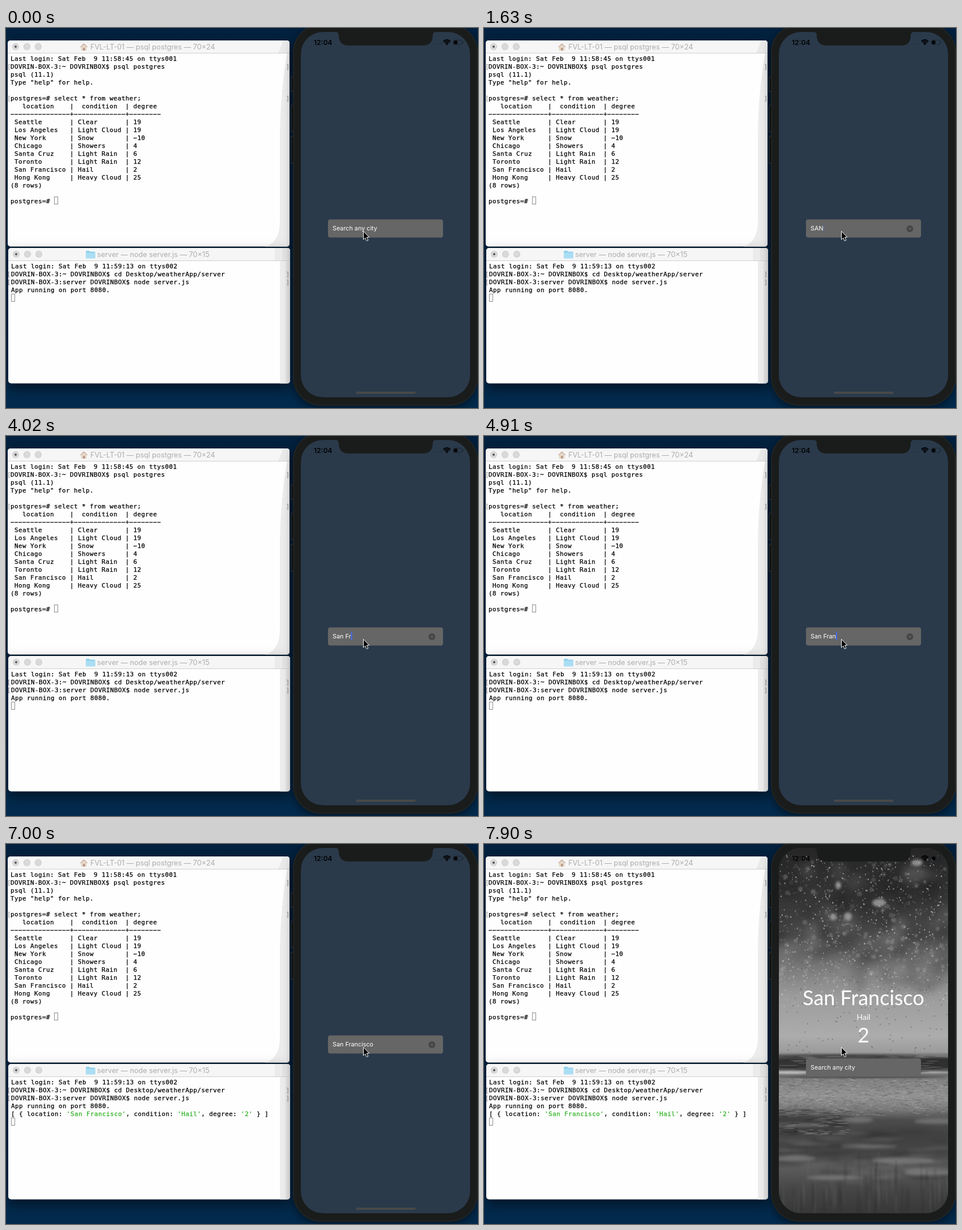
An HTML page with a canvas that plays this animation: 834x672 px, repeating every 8000 ms.

```html
<!DOCTYPE html>
<html lang="en">
<head>
<meta charset="utf-8">
<title>Weather app demo</title>
<style>
html, body { margin: 0; width: 100%; height: 100%; overflow: hidden; background: #01223f; }
canvas { display: block; }
</style>
</head>
<body>
<canvas id="stage" width="834" height="672"></canvas>
<script>
const W = 834, H = 672, LOOP = 8000, CELL = 7;
const LOG_AT = 6860, RESULT_AT = 7010, PHOTO_AT = 7900;
const MONO = '11px "DejaVu Sans Mono", monospace';
const UI = 'Inter, sans-serif', TITLE = 'Lato, sans-serif';
const BODY = '#1a1c1b', SCREEN = '#2a3a4b';
const c = document.getElementById('stage').getContext('2d');

// [time, typed text, caret opacity]
const typing = [
  [0, '', 0], [300, '', .5], [440, '', 1], [740, 'S', 1], [1480, 'SA', 1], [1630, 'SAN', .2],
  [2230, 'SA', .5], [2380, 'S', 1], [2680, 'Sa', 1], [2820, 'San', 1], [3120, 'San ', 1],
  [3570, 'San F', .5], [3720, 'San F', 1], [4020, 'San Fr', 1], [4610, 'San Fra', .5],
  [4760, 'San Fran', .7], [4910, 'San Fran', 1], [5510, 'San Franc', 1], [5810, 'San Franci', 1],
  [5960, 'San Francis', 1], [6260, 'San Francisco', 0], [RESULT_AT, '', 0]
];

const weather = [
  ['Seattle', 'Clear', '19'], ['Los Angeles', 'Light Cloud', '19'], ['New York', 'Snow', '−10'],
  ['Chicago', 'Showers', '4'], ['Santa Cruz', 'Light Rain', '6'], ['Toronto', 'Light Rain', '12'],
  ['San Francisco', 'Hail', '2'], ['Hong Kong', 'Heavy Cloud', '25']
];
const psqlLines = [
  'Last login: Sat Feb  9 11:58:45 on ttys001',
  'DOVRIN-BOX-3:~ DOVRINBOX$ psql postgres',
  'psql (11.1)',
  'Type "help" for help.',
  '',
  'postgres=# select * from weather;',
  '   location    |  condition  | degree',
  [15, 13, 8].map(n => '−'.repeat(n)).join('+'),
  ...weather.map(([city, sky, deg]) => ` ${city.padEnd(14)}| ${sky.padEnd(12)}| ${deg}`),
  '(8 rows)',
  '',
  'postgres=# '
];
const serverLines = [
  'Last login: Sat Feb  9 11:59:13 on ttys002',
  'DOVRIN-BOX-3:~ DOVRINBOX$ cd Desktop/weatherApp/server',
  'DOVRIN-BOX-3:server DOVRINBOX$ node server.js',
  'App running on port 8080.'
];
const logLine = "[ { location: 'San Francisco', condition: 'Hail', degree: '2' } ]";

function text(str, x, y, font, color, align = 'left') {
  c.font = font;
  c.fillStyle = color;
  c.textAlign = align;
  c.fillText(str, x, y);
}

function mono(str, x, y, color = '#000') {
  c.font = MONO;
  c.letterSpacing = CELL - c.measureText('0').width + 'px';
  text(str, x, y, MONO, color);
  c.strokeStyle = color;
  c.lineWidth = .25;
  c.strokeText(str, x, y);
  c.letterSpacing = '0px';
}

function round(x, y, w, h, r, color) {
  c.beginPath();
  c.roundRect(x, y, w, h, r);
  c.fillStyle = color;
  c.fill();
}

function shape(d, color, stroke) {
  const path = new Path2D(d);
  c.fillStyle = color;
  c.fill(path);
  if (stroke) {
    c.strokeStyle = stroke;
    c.lineWidth = 1;
    c.stroke(path);
  }
}

function disc(x, y, r, color) {
  c.beginPath();
  c.arc(x, y, r, 0, 7);
  c.fillStyle = color;
  c.fill();
}

function windowFrame(x, y, h, title, titleX) {
  c.save();
  c.shadowColor = 'rgba(0,0,0,.5)';
  c.shadowBlur = 22;
  c.shadowOffsetY = 9;
  round(x, y, 498, h, 5, '#fefefe');
  c.restore();
  round(x, y, 498, 22, [5, 5, 0, 0], '#f6f6f6');
  c.fillStyle = '#cfcfcf';
  c.fillRect(x, y + 22, 498, 1);
  for (let i = 0; i < 3; i++) {
    disc(x + 14 + i * 20, y + 11, 6, '#c6c6c6');
    disc(x + 14 + i * 20, y + 11, 5.2, '#d9d9d9');
  }
  disc(x + 14, y + 11, 2, '#555');
  text(title, titleX, y + 15.5, '12.7px ' + UI, '#acacac');
}

function promptMarks(y) {
  mono('[', 2, y, '#999');
  mono(']', 494.5, y, '#999');
}

function terminalCursor(x, y) {
  c.strokeStyle = '#8c8c8c';
  c.lineWidth = 1;
  c.strokeRect(x + .5, y + .5, 6, 13);
}

function psqlWindow() {
  windowFrame(3, 22, 364.5, 'FVL-LT-01 — psql postgres — 70×24', 149);
  shape('M490 22H496Q501 22 501 27V44H481Z', '#e9e9e9');
  shape('M497 45Q486 100 484 180V340Q484 380 458 386.5H496Q501 386.5 501 381V45Z', '#ececec');
  shape('M130.5 34L137.5 27L144.5 34Z', '#c9a99b');
  shape('M132.5 33.5L137.5 29L142.5 33.5V40H132.5Z', '#e6d9c9');
  shape('M136 35H139.5V40H136Z', '#b99a86');
  psqlLines.forEach((line, i) => mono(line, 8, 58 + 14 * i));
  promptMarks(72);
  promptMarks(128);
  terminalCursor(85, 298);
}

function serverWindow(logged) {
  windowFrame(4, 389, 239.5, 'server — node server.js — 70×15', 161);
  shape('M475 389H488V411H475Z', '#ebebeb');
  shape('M488 389H497Q502 389 502 394V411H488Z', '#e2e2e2');
  shape('M484 412H494V628.5H484Z', '#ececec');
  shape('M494 412H502V623Q502 628.5 497 628.5H494Z', '#e2e2e2');
  shape('M141 395.5Q141 394 142.5 394H147L148.5 395.5H156Q157.5 395.5 157.5 397V407H141Z', '#8fcfea');
  shape('M141 397.5H157.5V407.5H141Z', '#a9def4');
  serverLines.forEach((line, i) => mono(line, 9, 425 + 14 * i));
  promptMarks(439);
  promptMarks(453);
  if (logged) {
    mono(logLine.replace(/'[^']*'/g, s => ' '.repeat(s.length)), 9, 481);
    for (const m of logLine.matchAll(/'[^']*'/g)) mono(m[0], 9 + CELL * m.index, 481, '#2bb01f');
  }
  terminalCursor(9, logged ? 484 : 470);
}

// Monochrome rainy street, drawn once in screen coordinates.
function makePhoto() {
  const canvas = document.createElement('canvas');
  canvas.width = 299;
  canvas.height = 646;
  const p = canvas.getContext('2d');
  let seed = 7;
  const rnd = () => (seed = seed * 16807 % 2147483647) / 2147483647;
  const gray = (v, a = 1) => `rgba(${v},${v},${v},${a})`;
  const blob = (x, y, rx, ry, color) => {
    p.beginPath();
    p.ellipse(x, y, rx, ry, 0, 0, 7);
    p.fillStyle = color;
    p.fill();
  };
  p.translate(-521, -7);
  const g = p.createLinearGradient(0, 7, 0, 653);
  [[7, 38], [100, 54], [165, 76], [225, 126], [270, 156], [340, 172], [368, 155], [378, 80],
   [402, 85], [412, 125], [445, 146], [468, 125], [488, 75], [545, 68], [575, 90], [610, 70], [653, 55]]
    .forEach(([y, v]) => g.addColorStop((y - 7) / 646, gray(v)));
  p.fillStyle = g;
  p.fillRect(521, 7, 299, 646);

  p.filter = 'blur(7px)';
  for (let i = 0; i < 80; i++)
    blob(521 + rnd() * 299, 30 + rnd() * 220, 8 + rnd() * 14, 8 + rnd() * 12, gray(rnd() < .55 ? 20 : 150, .18));
  p.filter = 'blur(2px)';
  [[617, 129, 6, 6], [643, 128, 7, 7], [698, 104, 12, 7], [626, 73, 5, 7], [765, 33, 10, 6]]
    .forEach(b => blob(...b, gray(180, .7)));
  p.filter = 'blur(1px)';
  for (let i = 0; i < 200; i++) {
    const r = 1 + rnd() * 3.5;
    blob(521 + rnd() * 299, 30 + rnd() * 210, r, r, gray(175, .1 + rnd() * .25));
  }
  p.filter = 'none';
  for (let i = 0; i < 1000; i++) {
    const y = 20 + rnd() * 270, r = .4 + rnd() * .9;
    blob(521 + rnd() * 299, y, r, r * 1.2, gray(215, .2 + rnd() * .5));
  }
  for (let i = 0; i < 120; i++)
    blob(521 + rnd() * 299, 180 + rnd() * 190, 1, 1.2, gray(70, .45));

  p.filter = 'blur(1.5px)';
  blob(545, 388, 62, 9, gray(52));
  blob(800, 387, 45, 10, gray(48));
  blob(640, 375, 130, 3, gray(65, .8));
  blob(800, 376, 40, 1.5, gray(150, .7));
  blob(540, 404, 50, 3, gray(185));
  blob(795, 404, 38, 2, gray(175));
  blob(670, 412, 150, 2, gray(60, .8));
  p.filter = 'none';
  for (let i = 0; i < 90; i++)
    blob(521 + rnd() * 299, 374 + rnd() * 30, 6 + rnd() * 16, .7, gray(rnd() < .6 ? 40 : 150, .4));
  for (let i = 0; i < 900; i++)
    blob(521 + rnd() * 299, 415 + rnd() * 65, 1 + rnd() * 4, .6, gray(rnd() < .5 ? 75 : 185, .35));

  p.filter = 'blur(4px)';
  blob(555, 492, 90, 21, gray(60, .8));
  blob(740, 515, 90, 16, gray(62, .6));
  p.filter = 'blur(2.5px)';
  [[560, 478, 60, 2.5], [555, 497, 55, 3], [660, 488, 28, 5], [550, 556, 36, 5], [740, 560, 55, 6],
   [785, 580, 42, 7], [680, 535, 50, 3], [800, 490, 40, 5], [620, 590, 50, 4]]
    .forEach(b => blob(...b, gray(150, .5)));
  for (let i = 0; i < 60; i++)
    blob(521 + rnd() * 299, 505 + rnd() * 95, 10 + rnd() * 25, 2.5, gray(rnd() < .55 ? 38 : 135, .2));
  p.filter = 'blur(1.5px)';
  for (let i = 0; i < 70; i++)
    blob(521 + rnd() * 299, 570 + rnd() * 75, 1.5, 12 + rnd() * 25, gray(rnd() < .55 ? 35 : 120, .18));
  p.filter = 'none';
  for (let i = 0; i < 100; i++)
    blob(521 + rnd() * 130, 470 + rnd() * 45, 3 + rnd() * 10, 1, gray(rnd() < .5 ? 40 : 150, .35));
  return canvas;
}
const photo = makePhoto();

function statusBar() {
  text('12:04', 544, 29.5, '600 12px ' + UI, '#000');
  for (let i = 0; i < 4; i++) disc(757 + i * 3.7, 28, .8, '#1b2733');
  c.strokeStyle = '#000';
  c.lineWidth = 1.8;
  [3.5, 6.3, 9].forEach(r => {
    c.beginPath();
    c.arc(779, 30, r, -Math.PI * .75, -Math.PI * .25);
    c.stroke();
  });
  disc(779, 29, 1.2, '#000');
  c.beginPath();
  c.roundRect(790.5, 21.5, 15, 8, 2);
  c.strokeStyle = '#1a2530';
  c.lineWidth = 1;
  c.stroke();
  round(791.5, 22.5, 6, 6, 1, '#000');
  round(807, 24, 1.2, 3, 1, '#1a2530');
}

function searchField(t) {
  const [, typed, caret] = typing.findLast(k => k[0] <= t);
  const y = t < RESULT_AT ? 338.6 : 379.6, font = '10.8px ' + UI;
  round(568.9, y, 203.3, 31.9, 4, '#666');
  text(typed || 'Search any city', 577, y + 19.8, font, '#fff');
  c.globalAlpha = caret;
  c.fillStyle = '#486bf0';
  c.fillRect(577 + c.measureText(typed).width, y + 7.4, 2, 15);
  c.globalAlpha = 1;
  if (typed) {
    c.globalAlpha = t < 880 ? .35 : t < 1030 ? .7 : 1;
    disc(752.5, y + 16.4, 6, '#464646');
    shape(`M750.5 ${y + 14.4}l4 4m0 -4l-4 4`, 'transparent', '#707070');
    c.globalAlpha = 1;
  }
}

function phone(t) {
  [[86, 27], [136, 48], [191, 49]].forEach(([y, h]) => {
    round(503, y, 8, h, 1.5, '#36404a');
    round(504, y + 1, 8, h - 2, 1, '#121517');
  });
  c.save();
  c.shadowColor = 'rgba(0,0,0,.5)';
  c.shadowBlur = 16;
  c.shadowOffsetY = 5;
  round(507, -7, 327, 675, 50, '#222423');
  c.restore();
  round(509, -5, 323, 671, 48, BODY);

  round(521, 7, 299, 646, 39, SCREEN);
  if (t >= PHOTO_AT) {
    c.save();
    c.clip();
    c.drawImage(photo, 521, 7);
    c.restore();
  }
  shape('M582 7Q588 7 588 13Q588 31 606 31H736Q754 31 754 13Q754 7 760 7Z', BODY);
  statusBar();
  if (t < PHOTO_AT) round(618, 643, 106, 4, 2, '#48494a');
  if (t >= RESULT_AT) {
    text('San Francisco', 670.5, 284.5, '36px ' + TITLE, '#fff', 'center');
    text('Hail', 670.5, 311, '14px ' + TITLE, '#fff', 'center');
    text('2', 670.5, 351, '36px ' + TITLE, '#fff', 'center');
  }
  searchField(t);
  shape('M631.5 359.5V374L634.8 371L637.2 376.5L639.8 375.4L637.5 370H641.8Z', '#000', '#fff');
}

function draw(now) {
  const t = now % LOOP;
  const sky = c.createLinearGradient(0, 0, 0, H);
  sky.addColorStop(0, '#01213f');
  sky.addColorStop(1, '#022a4d');
  c.fillStyle = sky;
  c.fillRect(0, 0, W, H);
  psqlWindow();
  serverWindow(t >= LOG_AT);
  phone(t);
  requestAnimationFrame(draw);
}
requestAnimationFrame(draw);
</script>
</body>
</html>
```
